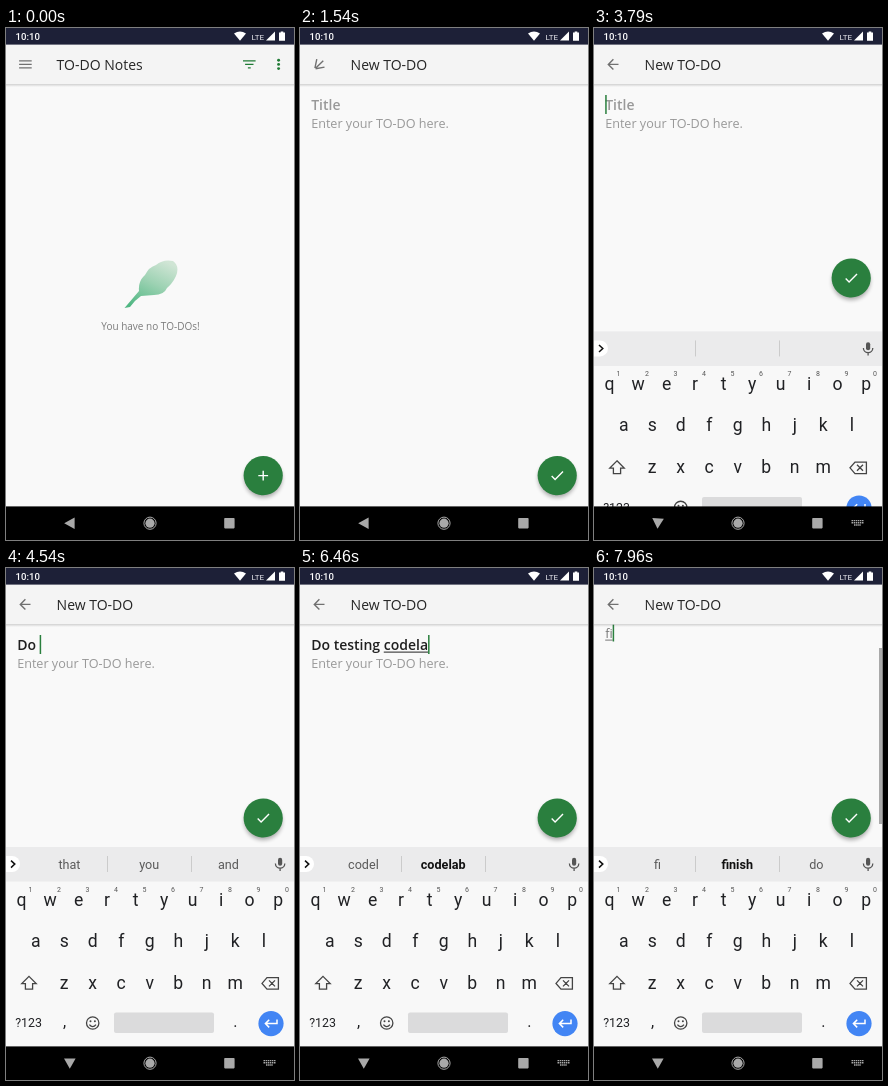
Recreate the animation shown at these times as an HTML page. Size 288 by 512 pixels, loop 8000 ms.

```html
<!DOCTYPE html>
<html lang="en">
<head>
<meta charset="utf-8">
<title>To-do notes</title>
<style>
html, body { margin: 0; width: 100%; height: 100%; overflow: hidden; background: #fafafa; }
svg { display: block; width: 100vw; height: 100vh; }
text { font-family: "Open Sans", sans-serif; white-space: pre; }
.kb text, .status text { font-family: Roboto, sans-serif; }
.mid { text-anchor: middle; }
.title { font-size: 14px; font-weight: 600; }
.body { font-size: 12.6px; }
.line { fill: none; stroke-linecap: butt; }
</style>
</head>
<body>
<svg viewBox="0 0 288 512" preserveAspectRatio="none">
  <defs>
    <linearGradient id="leaf" x1="0.75" y1="0" x2="0.2" y2="1">
      <stop offset="0" stop-color="#d0e5d5"/>
      <stop offset="0.45" stop-color="#9dd2b3"/>
      <stop offset="1" stop-color="#50b783"/>
    </linearGradient>
    <linearGradient id="fade" x1="0" y1="0" x2="0" y2="1">
      <stop offset="0" stop-color="#000" stop-opacity="0.16"/>
      <stop offset="1" stop-color="#000" stop-opacity="0"/>
    </linearGradient>
    <filter id="blur" x="-50%" y="-50%" width="200%" height="200%"><feGaussianBlur stdDeviation="2.2"/></filter>
    <clipPath id="round"><circle r="19.6"/></clipPath>
  </defs>
  <rect width="288" height="512" fill="#f9f9f9"/>

  <g id="list">
    <path d="M118.5 280 L133 263 Q132 253 139 247 Q143 239 150 237 Q157 231 167 233 Q174 238 170 248 Q167 255 161 260 Q158 267 148 267 L135 268 Q129 272 124 279 Z" fill="url(#leaf)"/>
    <text class="mid" x="144.5" y="301.5" font-size="10" fill="#7b7b7b">You have no TO-DOs!</text>
  </g>

  <g id="form">
    <text id="title" class="title" x="11.2" y="82"></text>
    <rect id="titleLine" height="1" y="83.6" fill="#222"/>
    <text id="body" class="body" x="11.2" y="99.5"></text>
    <rect id="bodyLine" height="1" y="101.6" fill="#777"/>
    <rect id="caret" width="1.5" fill="#2a7f3e"/>
  </g>
  <rect id="scrollbar" x="285" y="80" width="3" height="176" fill="#a9a9a9"/>

  <rect y="16" width="288" height="40.4" fill="#f4f4f4"/>
  <rect y="56" width="288" height="3" fill="url(#fade)"/>
  <path id="menu" class="line" stroke="#707070" stroke-width="2"/>
  <text id="heading" x="50.6" y="42" font-size="14" fill="#262626"></text>
  <g id="actions" fill="#1f7a34">
    <path d="M237 32.2h12.6v1.4H237zM239.1 35.7h8.4v1.4h-8.4zM241.9 39.2h2.8v1.4h-2.8z"/>
    <circle cx="272.6" cy="32.2" r="1.45"/><circle cx="272.6" cy="36.4" r="1.45"/><circle cx="272.6" cy="40.6" r="1.45"/>
  </g>

  <g class="status" fill="#fff">
    <rect width="288" height="16.6" fill="#1d2037"/>
    <text x="9.6" y="12" font-size="9.6" font-weight="500">10:10</text>
    <path d="M228 5.6Q234 1.6 240 5.6L234 12.8Z"/>
    <text x="245.6" y="11.6" font-size="8" fill="#e4e4ea">LTE</text>
    <path d="M260 12.6L269 3.6V12.6Z"/>
    <path d="M273 4.6h1.7v-1.2h2.6v1.2h1.7v8.2h-6z"/>
  </g>

  <g id="fab">
    <circle cy="3" r="19" fill="#000" opacity="0.32" filter="url(#blur)"/>
    <circle r="19.6" fill="#2a7f3e"/>
    <circle id="ripple" clip-path="url(#round)" fill="#fff"/>
    <path id="plus" class="line" d="M-4.9 0H4.9M0 -4.9V4.9" stroke="#fff" stroke-width="1.4"/>
    <path id="check" transform="scale(0.7) translate(-12 -12)" d="M9 16.17L4.83 12l-1.42 1.41L9 19 21 7l-1.41-1.41z" fill="#fff"/>
  </g>

  <g id="kb" class="kb">
    <rect y="279" width="288" height="200" fill="#f8f8f8"/>
    <rect y="279" width="288" height="34.5" fill="#ebebec"/>
    <path d="M0 288h6a8 8 0 0 1 0 16H0z" fill="#fff"/>
    <path class="line" d="M5 292.6l3.8 3.5-3.8 3.5" stroke="#111" stroke-width="1.5"/>
    <path class="line" d="M101.5 288v16M185.5 288v16" stroke="#cbcbcb"/>
    <g id="hints" class="mid" font-size="12.6"></g>
    <rect x="272" y="289.8" width="4.2" height="8" rx="2.1" fill="#555"/>
    <path class="line" d="M269.4 295.5a4.7 4.7 0 0 0 9.4 0M274.1 300.2v2.8" stroke="#555" stroke-width="1.3"/>
    <g id="keys" class="mid" fill="#202124"></g>
    <g class="line" stroke="#444" stroke-width="1.3">
      <path d="M23 408.4l7.2 7.2h-3.6v5.6h-7.2v-5.6h-3.6z"/>
      <path d="M261 409.6h11.4v11.6H261l-5-5.8zM263 412.4l6 6M269 412.4l-6 6"/>
      <circle cx="86.7" cy="455" r="6.2"/>
      <path d="M83.4 456.6q3.3 4 6.6 0"/>
    </g>
    <circle cx="84.5" cy="453.2" r="1" fill="#444"/><circle cx="88.9" cy="453.2" r="1" fill="#444"/>
    <rect x="108" y="444.6" width="100" height="20.4" rx="2" fill="#dbdbdc"/>
    <circle cx="265" cy="455.6" r="12.6" fill="#4285f4"/>
    <path class="line" d="M271 451.6v4h-11.4M263.2 451.8l-3.8 3.8 3.8 3.8" stroke="#fff" stroke-width="1.5"/>
  </g>

  <rect y="478.4" width="288" height="33.6"/>
  <path id="back" d="M-5.6 0L4.8 -5.8V5.8Z" fill="#a9a9a9"/>
  <circle cx="144" cy="495.2" r="6.1" fill="none" stroke="#a9a9a9" stroke-width="1"/>
  <circle cx="144" cy="495.2" r="4.6" fill="#a9a9a9"/>
  <rect x="218.2" y="490" width="10.4" height="10.4" rx="0.8" fill="#a9a9a9"/>
  <path id="kbIcon" class="line" d="M257.5 492.6h12M257.5 494.8h12M260 497h7" stroke="#a9a9a9" stroke-width="1.4" stroke-dasharray="1.5 0.6"/>
</svg>
<script>
const LOOP = 8000, OPEN = 1340, FOCUS = 3480, SHOW = 3660, NEXT = 6950;
const $ = id => document.getElementById(id);
const lerp = (a, b, p) => a + (b - a) * p;
const part = (t, from, to) => Math.min(1, Math.max(0, (t - from) / (to - from)));
const smooth = p => (1 - Math.cos(Math.PI * p)) / 2;
const out = p => 1 - (1 - p) ** 3;
const set = (node, attrs) => { for (const k in attrs) node.setAttribute(k, attrs[k]); };
const show = (id, on) => $(id).setAttribute("visibility", on ? "visible" : "hidden");

function addText(parent, x, y, str, attrs = {}) {
  const node = document.createElementNS("http://www.w3.org/2000/svg", "text");
  set(node, { x, y, ...attrs });
  node.textContent = str;
  parent.append(node);
  return node;
}

// Keyboard letters and suggestion slots
const rows = [["qwertyuiop", 15.6, 338], ["asdfghjkl", 29.8, 379], ["zxcvbnm", 58.2, 420.5]];
rows.forEach(([letters, x0, y], row) => [...letters].forEach((c, i) => {
  const x = x0 + i * 28.5;
  addText($("keys"), x, y, c, { "font-size": 17.6 });
  if (!row) addText($("keys"), x + 8.8, 324, (i + 1) % 10, { "font-size": 7, fill: "#555" });
}));
[["?123", 22.5, 12.4], [",", 58.5, 16], [".", 229.3, 16]].forEach(
  ([c, x, size]) => addText($("keys"), x, 459.4, c, { "font-size": size }));
const hints = [63.4, 143.2, 222.4].map(x => addText($("hints"), x, 301, ""));

// Typing: moment of each key press
const titleText = "Do testing codelab", bodyText = "fi";
const titleKeys = [4210, 4380, 4500, 5340, 5420, 5490, 5560, 5630, 5700, 5800,
  5930, 6090, 6170, 6240, 6310, 6380, 6450, 6550];
const bodyKeys = [7720, 7880];
const stops = [FOCUS, ...titleKeys, NEXT, ...bodyKeys];
const suggestions = [
  [0], [4210, "D", "Do", "Don't"], [4380, "Do", "Don't", "Dog"], [4500, "that", "you", "and"],
  [5340, "t", "the", "to"], [5420, "te", "tell", "the"], [5490, "tes", "test", "tea"],
  [5560, "test", "testing", "rest"], [5630, "testi", "testing", "resting"],
  [5700, "testin", "testing", "resting"], [5930, "the", "and", "is"],
  [6090, "c", "can", "come"], [6240, "cod", "code", "cold"], [6310, "code", "coded", "codes"],
  [6380, "code", "codelab", ""], [6450, "codel", "codelab", ""], [6550, "codela", "codelab", ""],
  [NEXT], [7720, "f", "for", "from"], [7880, "fi", "finish", "do"]
];

const pen = document.createElement("canvas").getContext("2d");
const fonts = { title: '600 14px "Open Sans", sans-serif', body: '12.6px "Open Sans", sans-serif' };
function width(field, str) {
  pen.font = fonts[field];
  return pen.measureText(str).width;
}
const typed = (str, keys, t) => str.slice(0, keys.filter(k => k <= t).length);

function drawField(id, str, hint, color, composing) {
  const node = $(id), start = str.lastIndexOf(" ") + 1;
  node.textContent = str || hint;
  node.setAttribute("fill", str ? color : "#999");
  const x = width(id, str.slice(0, start));
  set($(id + "Line"), { x: 11.2 + x, width: composing ? width(id, str) - x : 0 });
}

// Three bars that turn into a back arrow
function menuPath(p) {
  const head = lerp(18, 11.3, p), shaft = lerp(18, 16, p), angle = p * Math.PI / 4;
  const w = head * Math.cos(angle), h = head * Math.sin(angle);
  const gap = lerp(5, -0.7, p), edge = -shaft / 2, cut = 0.7 * p;
  return `M${edge + cut} 0h${shaft - 2 * cut}M${edge} ${gap}l${w} ${h}M${edge} ${-gap}l${w} ${-h}`;
}

function draw(t) {
  const opened = t >= OPEN, inBody = t >= NEXT, raised = t >= SHOW + 40;
  show("list", !opened);
  show("actions", !opened);
  show("plus", !opened);
  show("form", opened);
  show("check", opened);
  $("heading").textContent = opened ? "New TO-DO" : "TO-DO Notes";

  const turn = smooth(part(t, OPEN, OPEN + 300));
  set($("menu"), { d: menuPath(turn), transform: `translate(19.4 36.4) scale(0.7) rotate(${lerp(-180, 0, turn)})` });

  const press = part(t, 1120, OPEN);
  set($("ripple"), { r: 20 * out(press), opacity: press > 0 ? 0.2 * (1 - part(t, OPEN - 60, OPEN + 140)) : 0 });
  set($("fab"), { transform: `translate(257.2 ${raised ? 250 : 447.6})` });

  const rise = out(part(t, SHOW, SHOW + 260));
  set($("kb"), { transform: `translate(0 ${200 * (1 - rise)})` });
  show("kb", rise > 0);
  show("kbIcon", t >= FOCUS + 60);
  set($("back"), { transform: `translate(63.8 495.2) rotate(${-90 * smooth(part(t, 3570, 3820))})` });

  const title = typed(titleText, titleKeys, t), body = typed(bodyText, bodyKeys, t);
  drawField("title", title, "Title", "#202020", !inBody && title);
  drawField("body", body, "Enter your TO-DO here.", "#757575", body);

  // The caret blinks every half second after the latest input
  const last = stops.filter(s => s <= t).pop();
  const field = inBody ? "body" : "title";
  show("caret", last !== undefined && (t - last) % 1000 < 500);
  set($("caret"), {
    x: 11.2 + width(field, inBody ? body : title),
    y: inBody ? 86.5 : 67, height: inBody ? 17 : 19
  });

  const scroll = 30 * smooth(part(t, 7080, 7330));
  set($("form"), { transform: `translate(0 ${-scroll})` });
  show("scrollbar", scroll > 0);
  set($("scrollbar"), { y: 50 + scroll });

  const words = suggestions.filter(s => s[0] <= t).pop();
  const strong = words[0] && words[0] !== 4500 && words[0] !== 5930;
  hints.forEach((node, i) => {
    node.textContent = words[i + 1] || "";
    const bold = strong && i === 1;
    set(node, { "font-weight": bold ? 700 : 400, fill: bold ? "#111" : "#5a5a5a" });
  });
}

const begin = performance.now();
function tick() {
  draw((performance.now() - begin) % LOOP);
  requestAnimationFrame(tick);
}
tick();
</script>
</body>
</html>
```
